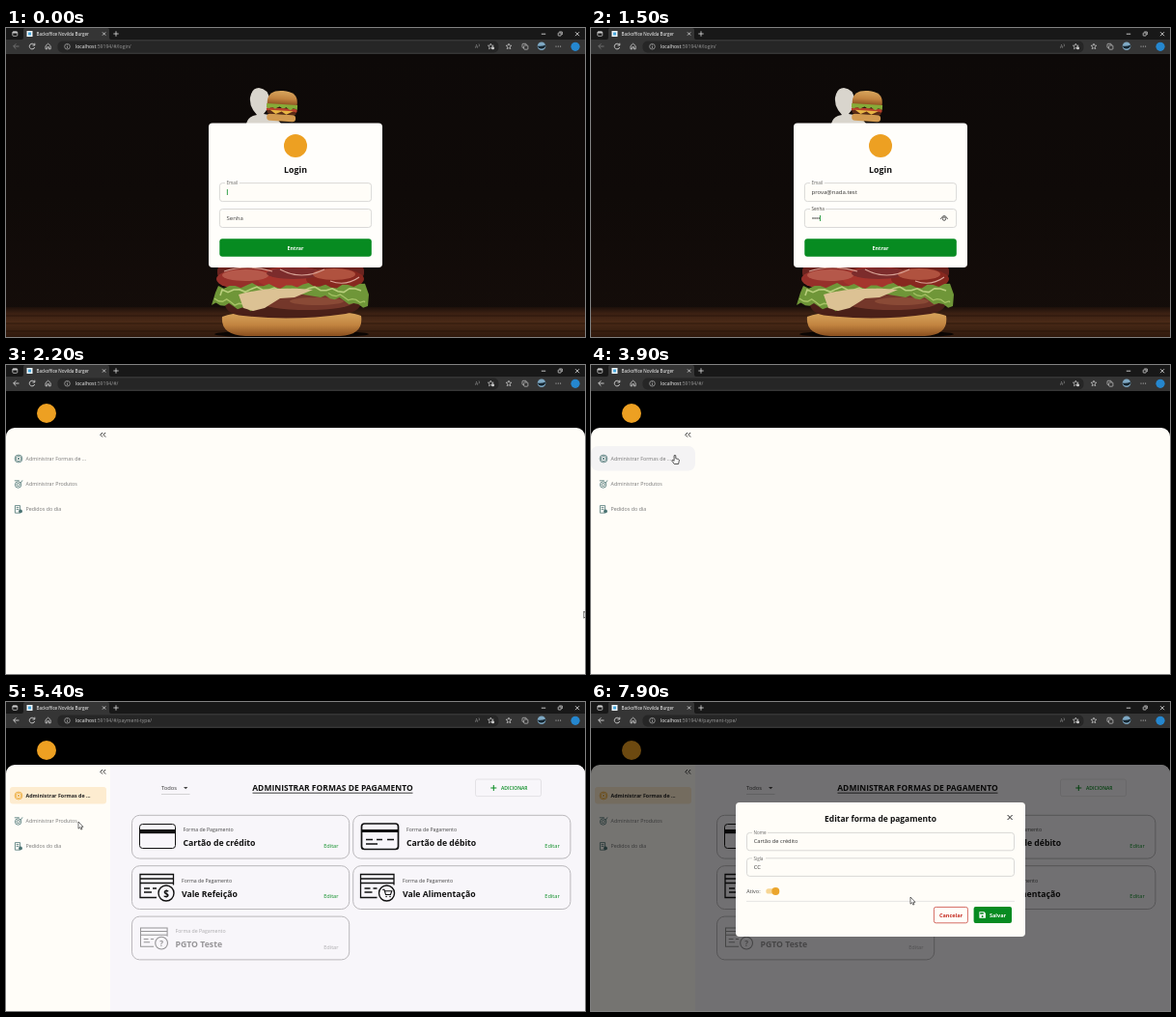
Recreate the animation shown at these times as an HTML page. Size 600 by 320 pixels, loop 8 s.

```html
<!DOCTYPE html>
<html lang="pt-BR">
<head>
<meta charset="utf-8">
<title>Backoffice</title>
<style>
  html, body { margin: 0; width: 100%; height: 100%; overflow: hidden; background: #000; }
  svg { display: block; width: 600px; height: 320px; }
  text { font-family: "Open Sans", "Noto Sans", sans-serif; white-space: pre; }
</style>
</head>
<body>
<svg id="stage" viewBox="0 0 600 320" xmlns="http://www.w3.org/2000/svg"></svg>
<script>
const LOOP = 8000;
const GREEN = '#078b21', PAPER = '#fffdf8', INK = '#111', TEAL = '#4a7373';
const EMAIL = 'prova@nada.test';
const BRAND = 'Novilda Burger';

// Markup helpers
const text = (x, y, size, fill, str, extra = '') =>
  `<text x="${x}" y="${y}" font-size="${size}" fill="${fill}" ${extra}>${str}</text>`;
const bold = (x, y, size, fill, str, extra = '') => text(x, y, size, fill, str, `font-weight="700" ${extra}`);
const rect = (x, y, w, h, r, fill, extra = '') =>
  `<rect x="${x}" y="${y}" width="${w}" height="${h}" rx="${r}" fill="${fill}" ${extra}/>`;
const line = (d, stroke = INK, w = 1, extra = '') =>
  `<path d="${d}" fill="none" stroke="${stroke}" stroke-width="${w}" ${extra}/>`;
const shape = (d, fill, extra = '') => `<path d="${d}" fill="${fill}" ${extra}/>`;
const disc = (x, y, r, fill, extra = '') => `<circle cx="${x}" cy="${y}" r="${r}" fill="${fill}" ${extra}/>`;
const oval = (x, y, rx, ry, fill) => `<ellipse cx="${x}" cy="${y}" rx="${rx}" ry="${ry}" fill="${fill}"/>`;
const group = (id, body, extra = '') => `<g id="${id}" ${extra}>${body}</g>`;
const MID = 'text-anchor="middle"', END = 'text-anchor="end"';

function ripple(x0, x1, y0, y1, amp, n) {
  let d = '';
  for (let i = 0; i <= n; i++) {
    const k = i / n, wave = Math.sin(i * 1.9) + .6 * Math.sin(i * .7);
    d += `L${(x0 + (x1 - x0) * k).toFixed(1)} ${(y0 + (y1 - y0) * k + amp * wave).toFixed(1)}`;
  }
  return d;
}

function chrome() {
  const c = '#c9c9c9';
  const star = (x, y) => {
    let d = '';
    for (let i = 0; i < 10; i++) {
      const r = i % 2 ? 1.4 : 3.1, a = i * Math.PI / 5 - Math.PI / 2;
      d += `${i ? 'L' : 'M'}${(x + r * Math.cos(a)).toFixed(1)} ${(y + r * Math.sin(a)).toFixed(1)}`;
    }
    return line(d + 'Z', c, .7);
  };
  return rect(0, 0, 600, 27, 0, '#181818') +
    shape('M0 12H16Q18 12 18 10V2Q18 0 20 0H105Q107 0 107 2V10Q107 12 109 12H600V27H0Z', '#353535') +
    rect(6.8, 3.8, 5, 4.5, 1, 'none', `stroke="${c}" stroke-width=".8"`) + rect(6.8, 3.8, 5, 1.6, .5, c) +
    rect(21.5, 3, 6, 6, 0, '#eef6fa') + rect(23, 4.5, 3, 3, 0, '#48a7dd') +
    text(31.5, 7.8, 4.55, '#fff', 'Backoffice ' + BRAND) +
    line('M100 4.4l3.2 3.2m0-3.2l-3.2 3.2', '#ddd', .8) +
    line('M111.3 6h5.4M114 3.3v5.4', '#ddd', .8) +
    line('M554.8 6.2h4.4M590 4.2l4 4m0-4l-4 4', '#eee', .8) +
    rect(572.2, 5, 3, 3, .5, 'none', 'stroke="#eee" stroke-width=".7"') + line('M573.3 4h3v3', '#eee', .7) +
    rect(53.5, 13.5, 457, 12, 5, '#262626') +
    line('M13.5 19H7.8M10.4 16.3L7.7 19l2.7 2.7', '#d5d5d5', .9, 'id="back"') +
    line('M29.4 17.5A2.8 2.8 0 1 0 29.7 20M29.8 15.7v2.3h-2.3', '#d5d5d5', .9) +
    line('M41 18.6l2.6-2.4 2.6 2.4v3.2h-1.7v-2.1h-1.8v2.1H41Z', '#d5d5d5', .8) +
    disc(63.5, 19.2, 2.8, 'none', `stroke="${c}" stroke-width=".6"`) + line('M63.5 18.8v2M63.5 17.4v.7', c, .7) +
    text(72, 21, 5.1, '#f5f5f5', 'localhost<tspan id="path" fill="#999"></tspan>') +
    text(486, 21, 5, '#999', 'A') + line('M490 16.5q1.2 1.3 0 2.8', '#999', .6) +
    star(502.3, 19.2) + disc(504.6, 20.8, 1.5, c) + star(521, 19.2) +
    rect(535, 16.3, 4.2, 4.2, .8, 'none', `stroke="${c}" stroke-width=".7"`) +
    rect(536.7, 18, 4.2, 4.2, .8, '#353535', `stroke="${c}" stroke-width=".7"`) +
    disc(555, 18.8, 4.3, '#7fa9c4') + shape('M550.8 18.5q4 1 8.4-1a4.3 4.3 0 0 1-8.4 1Z', '#142530') +
    disc(570, 19, .6, c) + disc(572.3, 19, .6, c) + disc(574.6, 19, .6, c) +
    disc(590, 19.3, 4.6, '#2587cf');
}

function backdrop() {
  return rect(0, 27, 600, 293, 0, 'url(#wall)') + rect(0, 289, 600, 31, 0, 'url(#floor)') +
    [298, 306, 314].map(y => line(`M0 ${y}H600`, '#1c0e07', 1, 'opacity=".55"')).join('') +
    // mascot
    shape('M249 99Q251 91 260 90Q252 82 253 72Q255 62 262 62Q272 63 273 74Q272 84 267 89Q279 90 285 99Z', '#d9d5cd') +
    // small burger
    '<g transform="rotate(4 286 81)">' +
    shape('M270.5 80V76Q271 65 286 65Q301 65 301.5 76V80Z', 'url(#bun)') +
    rect(270, 83, 32, 4, 2, '#b6402a') + shape('M270 79' + ripple(270, 302, 83, 83, 1, 14) + 'L302 79Z', '#86ab38') +
    rect(271, 86, 30, 3.4, 1.5, '#5b2c16') + shape('M274 85.5h24l-7 4-5-3-6 3Z', '#e8b544') +
    rect(271, 89.5, 30, 7, 3.5, '#d29a50') + '</g>' +
    // big burger
    oval(296, 317, 80, 4, '#0a0503') +
    rect(219, 246, 152, 13, 5, '#6b241f') +
    oval(250, 260, 32, 11, '#96302a') + oval(296, 259, 36, 12, '#a5352d') + oval(341, 260, 30, 11, '#87281f') +
    oval(248, 256, 24, 6, '#b5584a') + oval(298, 254, 28, 6, '#7c2c2c') + oval(340, 255, 22, 6, '#b0523f') +
    line('M226 252Q250 244 276 252M284 250Q306 262 330 250M336 262Q352 268 366 258', '#d9a396', 1.2) +
    shape('M224 299Q240 292 296 294Q354 292 368 298Q371 318 346 319H248Q222 318 224 299Z', 'url(#bun)') +
    shape('M226 278Q296 264 368 278Q371 293 352 296Q296 304 246 298Q224 297 226 278Z', '#4a2018') +
    oval(312, 284, 48, 8, '#74372a') + oval(322, 283, 28, 4, '#8a4a36') +
    shape('M217 274' + ripple(220, 372, 267, 267, 2, 26) + 'L376 276' + ripple(375, 326, 288, 278, 2, 10) +
      'L290 273L262 280' + ripple(258, 213, 291, 286, 2, 10) + 'Z', '#6f9638') +
    line('M222 277' + ripple(224, 368, 271, 271, 2, 24), '#b9cf7c', 1.6) +
    line('M256 287' + ripple(254, 216, 287, 282, 2, 9), '#a6c365', 1.4) +
    line('M372 284' + ripple(371, 334, 283, 276, 1.6, 9), '#a6c365', 1.2) +
    shape('M241 276Q272 267 318 271L299 279L284 280L268 290L256 293L246 290Z', '#dcc294');
}

function field(x, y, w, h, label, labelW) {
  return rect(x, y, w, h, 3, PAPER, 'stroke="#d0d0ce" stroke-width=".8"') +
    rect(x + 5.5, y - 1, labelW, 2, 0, PAPER) + text(x + 7, y + 1.7, 4.6, '#666', label);
}

function login() {
  return backdrop() + rect(210, 98.5, 180, 149.5, 4, '#fffefb') +
    disc(300, 122, 12, '#eda022') +
    bold(300, 150, 8.8, INK, 'Login', MID) +
    field(221.4, 160.6, 157.2, 19, 'Email', 15) +
    text(228.5, 172, 6, '#333', '', 'id="email"') +
    rect(221.4, 187.5, 157.2, 19, 3, PAPER, 'stroke="#d0d0ce" stroke-width=".8"') +
    rect(227, 186.5, 16, 2, 0, PAPER, 'id="notch"') +
    text(228.5, 199, 6, '#444', 'Senha', 'id="senha"') +
    [0, 1, 2, 3, 4, 5].map(i => disc(230 + i * 2.05, 197, .8, '#333', 'class="dot"')).join('') +
    rect(229, 194, .8, 6, 0, GREEN, 'id="caret"') +
    group('eye', line('M362.3 197.8Q366 191.2 369.7 197.8', '#444', .9) +
      disc(366, 197.6, 1.7, 'none', 'stroke="#444" stroke-width=".9"')) +
    rect(221.3, 218.2, 157.5, 18.5, 3, GREEN) + bold(300, 229.5, 5.4, '#fff', 'Entrar', MID);
}

function menuIcons() {
  const pen = 'stroke="currentColor" stroke-width=".8"';
  return [
    disc(0, 0, 3.9, 'none', pen) +
      line('M-2.5 -1.4L0 -2.8L2.5 -1.4V1.4L0 2.8L-2.5 1.4Z', 'currentColor', .7) + disc(0, 0, 1, 'currentColor'),
    disc(-.4, .8, 3.2, 'none', pen) + disc(-.4, .8, 1.5, 'none', pen) +
      line('M-4.2 -3.4H.8M2 -.6L4 -3.8', 'currentColor', .8),
    line('M-3.6 -3.8H1.6V3.8H-3.6ZM-2.4 -1.8H.4M-2.4 0H.4', 'currentColor', .8) + disc(2, 2, 1.9, 'currentColor')
  ];
}

function sidebar() {
  const names = ['Administrar Formas de ...', 'Administrar Produtos', 'Pedidos do dia'];
  return rect(0, 84, 108, 25.5, 7, '#f4f3f4', 'id="hover"') +
    rect(4, 88, 100, 17.5, 3, '#fdecd0', 'id="picked"') +
    line('M100 70l-2.2 2.3 2.2 2.3M103.2 70l-2.2 2.3 2.2 2.3', '#222', .9) +
    menuIcons().map((icon, i) => `<g transform="translate(13 ${97 + i * 26.2})" color="${TEAL}" id="icon${i}">${icon}</g>` +
      text(20.5, 99 + i * 26.2, 5.35, '#777', names[i], `id="item${i}"`)).join('');
}

function cardIcon(kind) {
  if (kind === 0) return rect(138.5, 126.5, 37, 25, 3, 'none', 'stroke="#111" stroke-width="1"') + rect(138.5, 132, 37, 4.2, 0, INK);
  if (kind === 1) return rect(368.5, 126, 38, 26.5, 3, 'none', 'stroke="#111" stroke-width="1.7"') +
    line('M368.5 133.5H406.5', INK, 3) + line('M373 142.5h7M384 142.5h6M373 147h12M395 142.5h7', INK, 1.6);
  const [x, y, s, sign] = [[139, 178.5, 1, '$'], [367.5, 178.5, 1, ''], [139.5, 234, .8, '?']][kind - 2];
  const cart = line('M22.5 15.8h2l1.5 5.2h5l1.3-3.8h-7', INK, 1.1) + disc(26.6, 23, .8, INK) + disc(30.5, 23, .8, INK);
  return `<g transform="translate(${x} ${y}) scale(${s})">` +
    line('M17 24H0V0H34.5V11M0 4.5H34.5M0 9H34.5M4 14.5h6M13 14.5h4M4 18.5h8', INK, 1.3) +
    disc(27, 19.5, 8, '#f8f6fa', 'stroke="#111" stroke-width="1.4"') +
    (sign ? bold(27, 23.2, 10, INK, sign, MID) : cart) + '</g>';
}

function cards() {
  const list = [['Cartão de crédito', 183.5], ['Cartão de débito', 415], ['Vale Refeição', 182], ['Vale Alimentação', 411], ['PGTO Teste', 175.5]];
  return list.map(([name, x], i) => {
    const left = i % 2 ? 359.7 : 130.5, y = 117.3 + 52.4 * (i >> 1), off = i === 4;
    return rect(left, y, 225.2, 44.8, 8, 'none', 'stroke="#b4b2b5" stroke-width=".9"') +
      `<g opacity="${off ? .42 : 1}">` + cardIcon(i) + text(x, y + 16.8, 5.2, '#444', 'Forma de Pagamento') +
      bold(x, y + 31.8, 8.7, INK, name) +
      text(left + 214, y + 33.7, 5.6, off ? '#444' : GREEN, 'Editar', END) + '</g>';
  }).join('');
}

function payments() {
  return rect(108, 65, 492, 255, 0, '#f8f6fa') +
    text(161, 91, 5.8, '#333', 'Todos') + shape('M184 88h4.4l-2.2 2.3Z', '#444') + line('M161 95.5H190.5', '#bbb', .6) +
    bold(338.5, 92.3, 8.5, INK, 'ADMINISTRAR FORMAS DE PAGAMENTO', MID) + line('M255.5 94.2H421.5', INK, .8) +
    rect(486.5, 80, 68, 17.6, 2, 'none', 'stroke="#dedce0" stroke-width=".8"') +
    line('M502.3 89h6M505.3 86v6', GREEN, 1) + text(513, 91, 5, GREEN, 'ADICIONAR', 'font-weight="600"') +
    group('cards', cards());
}

function dialog() {
  return rect(150, 104, 300, 139, 4, PAPER) +
    bold(300, 124, 8.45, INK, 'Editar forma de pagamento', MID) +
    line('M431.6 117l5 5m0-5l-5 5', '#222', 1) +
    field(161.5, 135.4, 277, 18.4, 'Nome', 16) + text(168.7, 146.2, 5.7, '#333', 'Cartão de crédito') +
    field(161.5, 161.8, 277, 18.6, 'Sigla', 14) + text(168.7, 173, 5.8, '#333', 'CC') +
    text(161.3, 198, 5.5, '#444', 'Ativo:') +
    rect(181.3, 193.2, 13.6, 5.4, 2.7, '#f7d694') + disc(191.3, 195.9, 4, '#eba52c') +
    line('M161 206.4H439', '#ddd', .7) +
    rect(355.4, 212.4, 35, 16.4, 2, PAPER, 'stroke="#c9483f" stroke-width=".8"') + bold(373, 222.6, 5.5, '#c4281e', 'Cancelar', MID) +
    rect(396.6, 212, 39.4, 17, 2, GREEN) + bold(413, 222.6, 5.5, '#fff', 'Salvar') +
    shape('M402.4 217.3h5l1.5 1.5v4.9h-6.5Z', '#fff') + rect(403.2, 218.2, 3.6, 1.5, 0, GREEN) + disc(405.6, 222, 1, GREEN);
}

function arc(r, a, b) {
  const at = deg => `${(r * Math.cos(deg * Math.PI / 180)).toFixed(2)} ${(r * Math.sin(deg * Math.PI / 180)).toFixed(2)}`;
  return `M${at(a)}A${r} ${r} 0 0 1 ${at(b)}`;
}

const gradient = (id, stops) => `<linearGradient id="${id}" x2="0" y2="1">` +
  stops.map(([at, color]) => `<stop offset="${at}" stop-color="${color}"/>`).join('') + '</linearGradient>';

const stage = document.getElementById('stage');
stage.innerHTML = '<defs>' +
  gradient('wall', [[0, '#0d0908'], [.5, '#0f0a08'], [1, '#150d0a']]) +
  gradient('floor', [[0, '#1d100a'], [.2, '#3a2013'], [.5, '#4a2a17'], [1, '#2f190d']]) +
  gradient('bun', [[0, '#d9a75f'], [.55, '#c28440'], [1, '#8a4f1f']]) +
  '<clipPath id="panel"><rect y="65" width="600" height="280" rx="9"/></clipPath></defs>' +
  group('login', login()) +
  group('admin', rect(0, 27, 600, 293, 0, '#000') + disc(42, 50, 10, '#eda022') +
    `<g clip-path="url(#panel)">${rect(0, 65, 600, 255, 0, PAPER)}${sidebar()}${group('pay', payments())}</g>`) +
  rect(0, 27, 600, 293, 0, '#000', 'id="veil"') +
  group('spin', [100, 220, 340].map(a => line(arc(11.5, a, a + 100), '#fff', 2, 'stroke-linecap="round"')).join('')) +
  group('dialog', dialog()) + chrome() +
  group('arrow', shape('M0 0V7.2L1.7 5.7L2.8 8.1L4 7.5L2.9 5.3H5Z', '#fff', 'stroke="#111" stroke-width=".6"')) +
  group('hand', shape('M-.9 .3Q0 -.8 .8 .3V3.3L3.7 4Q4.6 4.4 4.3 5.6L3.6 9H-.7L-3.2 5.7Q-3.1 4.5 -1.9 5L-.9 5.9Z', '#fff', 'stroke="#111" stroke-width=".7"'));

const $ = id => document.getElementById(id);
const dots = [...document.querySelectorAll('.dot')];
const clamp = v => Math.max(0, Math.min(1, v));
const ramp = (t, a, b) => clamp((t - a) / (b - a));
const ease = v => v * v * (3 - 2 * v);
const set = (el, name, value) => el.setAttribute(name, value);
const show = (id, on) => set($(id), 'visibility', on ? 'inherit' : 'hidden');
const fade = (id, v) => { set($(id), 'opacity', v); show(id, v > 0); };

// time, x, y of the pointer tip
const route = [[1900, 598.8, 255], [3050, 598.8, 255], [3850, 87, 93.5], [4300, 87, 93.5], [4850, 75, 124],
  [5500, 75, 124], [6500, 245.5, 146], [7000, 336, 148], [7250, 336, 148], [7850, 331, 202]];

function pointer(t) {
  let i = 0;
  while (i < route.length - 2 && t >= route[i + 1][0]) i++;
  const [t0, x0, y0] = route[i], [t1, x1, y1] = route[i + 1], k = ease(ramp(t, t0, t1));
  return [x0 + (x1 - x0) * k, y0 + (y1 - y0) * k];
}

function draw(t) {
  const inside = ramp(t, 2050, 2180), paying = t >= 4450;
  $('path').textContent = ':59194/#/' + (t < 2000 ? 'login/' : paying ? 'payment-type/' : '');
  set($('back'), 'stroke', t < 2000 ? '#777' : '#d5d5d5');

  // login form
  const typed = Math.floor(EMAIL.length * ramp(t, 150, 900));
  const secret = Math.floor(ramp(t, 1050, 1650) * 6);
  const lift = ease(ramp(t, 950, 1080)), onPass = t >= 950;
  $('email').textContent = EMAIL.slice(0, typed);
  set($('senha'), 'y', 199 - 9.8 * lift);
  set($('senha'), 'font-size', 6 - 1.4 * lift);
  fade('notch', lift);
  dots.forEach((d, i) => set(d, 'visibility', i < secret ? 'inherit' : 'hidden'));
  set($('caret'), 'x', onPass ? 229 + secret * 2.05 : 228.9 + (typed ? $('email').getComputedTextLength() : 0));
  set($('caret'), 'y', onPass ? 194 : 167);
  show('caret', t < 1800);
  show('eye', onPass);
  show('login', inside < 1);
  fade('admin', inside);

  // menu and list
  const [x, y] = pointer(t), overItem = !paying && x < 108 && y > 84 && y < 109.5;
  show('hover', overItem);
  show('picked', paying);
  set($('item0'), 'font-weight', paying ? 700 : 400);
  set($('item0'), 'fill', paying ? '#222' : '#777');
  set($('icon0'), 'color', paying ? '#eba52c' : TEAL);
  fade('pay', ramp(t, 4400, 4520));
  show('cards', t >= 5100);

  // overlays
  const wait = Math.max(Math.min(ramp(t, 1780, 1880), 1 - ramp(t, 2030, 2150)),
    Math.min(ramp(t, 4520, 4670), 1 - ramp(t, 5030, 5180)));
  const modal = ramp(t, 7120, 7280);
  fade('veil', .54 * Math.max(wait, modal));
  fade('spin', wait);
  set($('spin'), 'transform', `translate(300 173.5) rotate(${(t - 4900) * .36})`);
  fade('dialog', modal);

  const overEdit = t > 5200 && modal < 1 && x > 328 && y < 152, hand = overItem || overEdit;
  show('hand', t >= 1900 && hand);
  show('arrow', t >= 1900 && !hand);
  set($(hand ? 'hand' : 'arrow'), 'transform', `translate(${x} ${y})`);
}

function tick() {
  draw(performance.now() % LOOP);
  requestAnimationFrame(tick);
}
tick();
</script>
</body>
</html>
```
